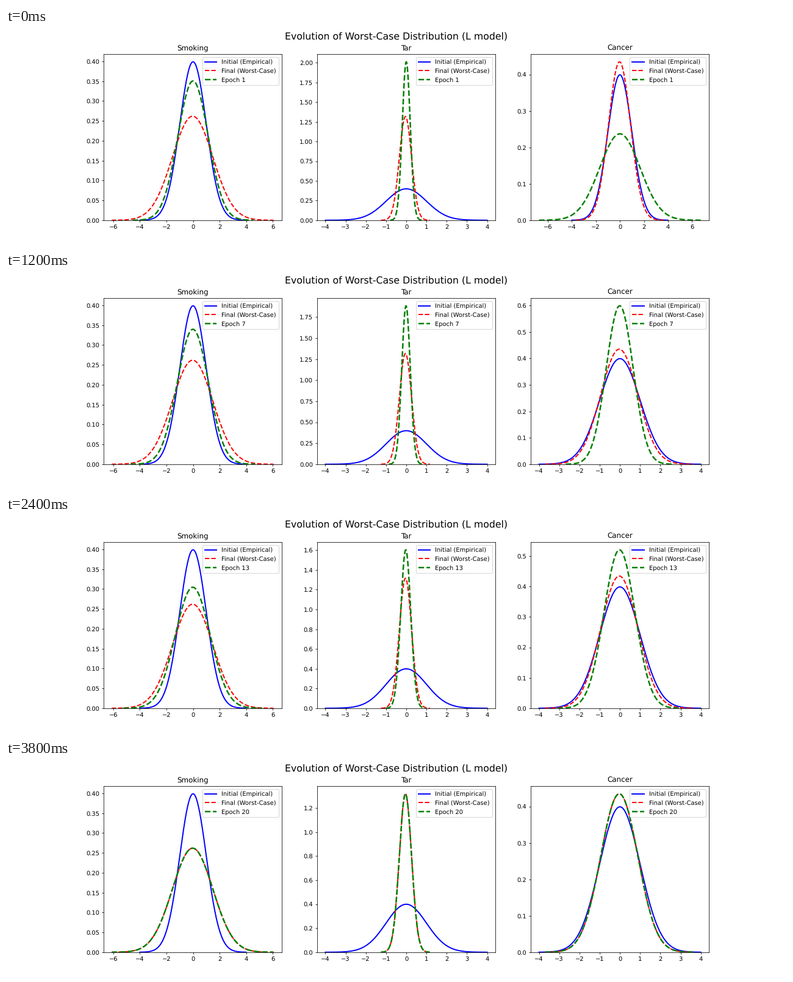
These frames come from a looping animation (1280x356 px, 4 s). A matplotlib script:

```python
import numpy as np
import matplotlib.pyplot as plt
from matplotlib.animation import FuncAnimation

EPOCHS = 20
KEY_EPOCHS = [2, 3, 5, 9, 15, 20]
ROOT_2PI = np.sqrt(2 * np.pi)


def peak_curve(first, keys):
    """Peak density by epoch: a first value, then a smooth curve in log(epoch)."""
    fit = np.polyfit(np.log(KEY_EPOCHS), keys, len(keys) - 1)
    return lambda epoch: first if epoch == 1 else np.polyval(fit, np.log(epoch))


# name, peak density by epoch, final mean
VARIABLES = [
    ("Smoking", peak_curve(0.3507, [0.280, 0.303, 0.3336, 0.3327, 0.2901, 0.262]), -0.03),
    ("Tar", peak_curve(2.012, [1.65, 1.755, 1.889, 1.81, 1.505, 1.317]), -0.04),
    ("Cancer", peak_curve(0.237, [0.472, 0.544, 0.595, 0.58, 0.491, 0.4346]), -0.03),
]

plt.rcParams.update({"font.family": "DejaVu Sans", "text.hinting": "none"})
fig, axes = plt.subplots(1, 3, figsize=(17.9776, 5), dpi=71.2)
fig.suptitle("Evolution of Worst-Case Distribution (L model)", fontsize=16)


def plot_normal(ax, mean, peak, style, lw, label):
    sd = 1 / (ROOT_2PI * peak)
    x = np.linspace(mean - 4 * sd, mean + 4 * sd, 200)
    y = peak * np.exp(-0.5 * ((x - mean) / sd) ** 2)
    ax.plot(x, y, style, lw=lw, label=label)


def update(i):
    epoch = i + 1
    progress = i / (EPOCHS - 1)
    for ax, (name, peak, mean) in zip(axes, VARIABLES):
        ax.clear()
        plot_normal(ax, 0, 1 / ROOT_2PI, "b-", 2, "Initial (Empirical)")
        plot_normal(ax, mean, peak(EPOCHS), "r--", 2, "Final (Worst-Case)")
        plot_normal(ax, mean * progress, peak(epoch), "g--", 2.5, f"Epoch {epoch}")
        ax.set_title(name)
        ax.set_ylim(bottom=0)
        ax.legend(loc="upper right")
    return []


anim = FuncAnimation(fig, update, frames=EPOCHS, interval=200,
                     repeat=True, repeat_delay=0, blit=False)
plt.show()
```
